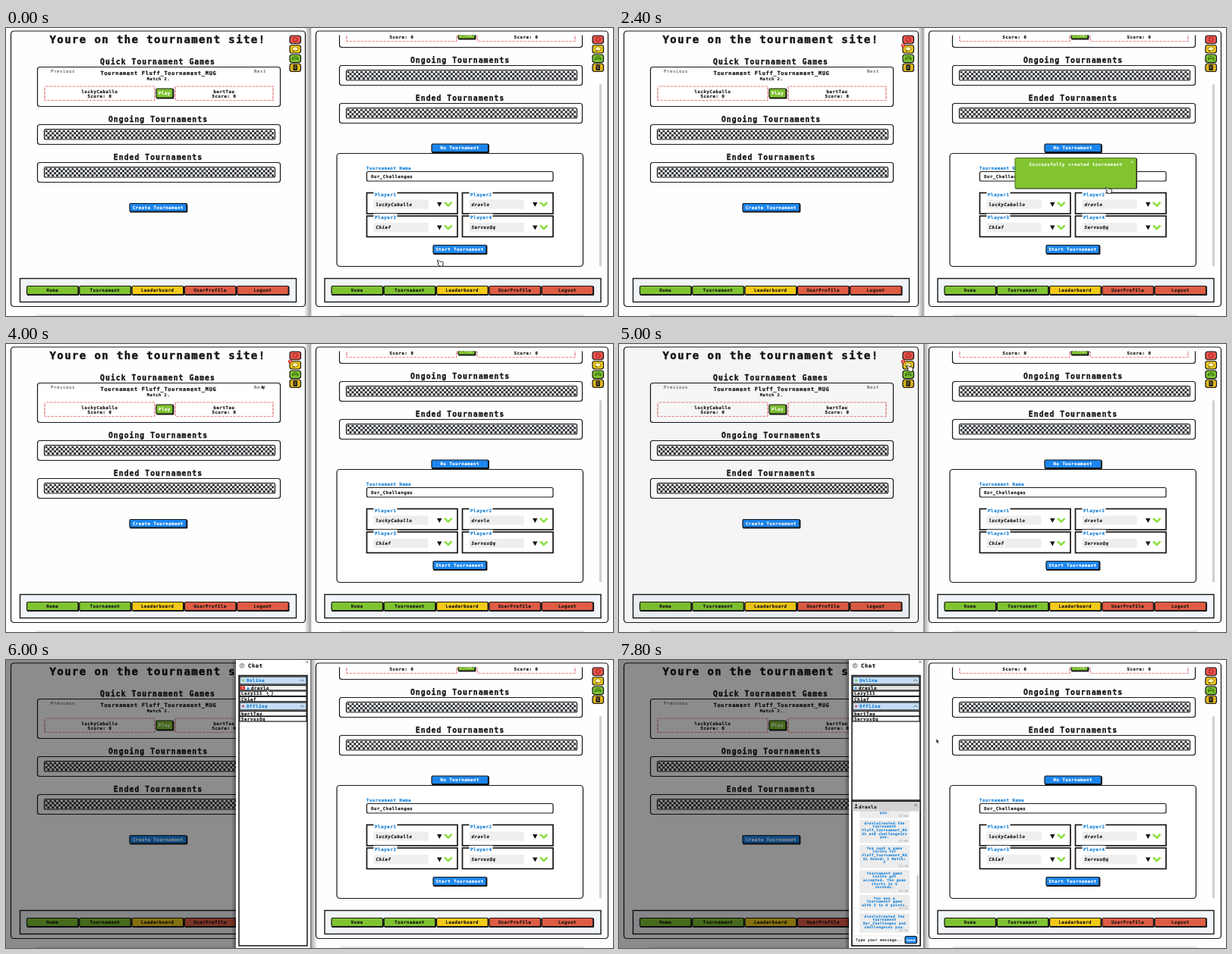
Recreate the animation shown at these times as an HTML page. Size 800 by 380 pixels, loop 8000 ms.

```html
<!DOCTYPE html>
<html lang="en">
<head>
<meta charset="utf-8">
<title>Tournament site</title>
<style>
html, body { margin: 0; width: 100%; height: 100%; overflow: hidden; background: #fdfdfd; }
svg { display: block; width: 800px; height: 380px; }
text { font-family: "DejaVu Sans Mono", "Liberation Mono", monospace; font-weight: 700; letter-spacing: .1em; white-space: pre; stroke-width: .035em; }
.thin { font-weight: 400; }
.slant { font-style: italic; }

.anim { animation: 8s linear infinite; }
.step { animation: 8s step-end infinite; }
#cursor { animation-name: travel; }
#hand { animation-name: hand; }
#arrow { animation-name: arrow; }
#handSize { animation-name: press; }
#toast { animation-name: toast; }
#badge { animation-name: badge; }
#rightFocus { animation-name: rightFocus; }
#leftFocus { animation-name: leftFocus; }
#mask { animation-name: mask; }
#drawer { animation-name: drawer; }
#unread { animation-name: unread; }
#chat { animation-name: chat; }

@keyframes travel {
  0%, 2.5% { transform: translate(572px, 310px); }
  12.5%, 17.5% { transform: translate(602px, 299px); }
  30% { transform: translate(645px, 214px); }
  35%, 37.5% { transform: translate(676px, 177px); }
  47.5%, 52.5% { transform: translate(339px, 57px); }
  60%, 65% { transform: translate(383px, 32px); }
  75%, 80% { transform: translate(347px, 43px); }
  95%, 100% { transform: translate(420px, 107px); }
}
@keyframes hand { 0% { opacity: 1; } 37.5% { opacity: 0; } 57.5% { opacity: 1; } 81% { opacity: 0; } }
@keyframes arrow { 0% { opacity: 0; } 37.5% { opacity: 1; } 57.5% { opacity: 0; } 81% { opacity: 1; } }
@keyframes press { 0% { transform: none; } 14% { transform: scale(.5); } 18% { transform: none; } }
@keyframes toast { 0% { opacity: 0; } 20% { opacity: 1; } 37.5% { opacity: 0; } }
@keyframes badge { 0% { opacity: 0; } 20% { opacity: 1; } }
@keyframes rightFocus { 0% { opacity: 1; } 52.5% { opacity: 0; } }
@keyframes leftFocus { 0% { opacity: 0; } 52.5% { opacity: 1; } }
@keyframes mask { 0%, 62.2% { opacity: 0; } 66%, 100% { opacity: .45; } }
@keyframes drawer {
  0%, 62.5% { transform: translateX(110px); animation-timing-function: cubic-bezier(.23, 1, .32, 1); }
  66.25%, 100% { transform: none; }
}
@keyframes unread { 0% { opacity: 1; } 80% { opacity: 0; } }
@keyframes chat { 0% { opacity: 0; } 80% { opacity: 1; } }
</style>
</head>
<body>
<script>
const INK = '#161616', BLUE = '#1c86ee', LINK = '#1681d8';
const GREEN = '#7fc331', YELLOW = '#f3ca18', RED = '#df5c44';
const GUEST = 'dravlo', HOST = 'luckyCaballo', CUP = 'Fluff_Tournament_MUG', NEW_CUP = 'Our_Challenges';

// Text is sized by its character advance and centred on y.
const text = (x, y, advance, label, { anchor = 'middle', fill = INK, cls = '' } = {}) => {
  const size = advance / .702, stroke = cls === 'thin' ? 'none' : fill;
  return `<text x="${x}" y="${(y + size * .36).toFixed(2)}" font-size="${size.toFixed(2)}" text-anchor="${anchor}" fill="${fill}" stroke="${stroke}" class="${cls}">${label}</text>`;
};
const left = (x, y, advance, label, fill = INK, cls = '') => text(x, y, advance, label, { anchor: 'start', fill, cls });
const box = (x, y, w, h, { fill = '#fff', stroke = INK, width = 1.2, r = 3 } = {}) =>
  `<rect x="${x}" y="${y}" width="${w}" height="${h}" rx="${r}" fill="${fill}" stroke="${stroke}" stroke-width="${width}"/>`;
const plain = (x, y, w, h, fill, r = 0) => box(x, y, w, h, { fill, stroke: 'none', r });
const line = (d, stroke = INK, width = 1) => `<path d="${d}" fill="none" stroke="${stroke}" stroke-width="${width}"/>`;
const dot = (x, y, r, fill) => `<circle cx="${x}" cy="${y}" r="${r}" fill="${fill}"/>`;
const cross = (x, y, r, color = '#555') => line(`M${x - r} ${y - r}l${2 * r} ${2 * r}m0 ${-2 * r}l${-2 * r} ${2 * r}`, color, .7);
const button = (x, y, w, h, fill, label, color = '#fff') =>
  plain(x, y, w + 1.4, h + 1.4, INK, 1.5) + box(x, y, w, h, { fill, r: 1.5 }) + text(x + w / 2, y + h / 2, 3.95, label, { fill: color });

const section = (y, title) => text(200.5, y - 7.5, 6.9, title) + box(41.5, y, 320, 26) +
  box(50.5, y + 6, 304, 13.5, { r: 2 }) +
  `<g transform="translate(51.6 ${y + 7})"><rect width="301.6" height="11.6" fill="url(#checks)"/></g>`;

const player = (x, w, name) =>
  line(`M${x} 77h${w}M${x} 95.5h${w}`, '#ec8585') + line(`M${x} 77v18.5m${w} 0v-18.5`, '#d9545c') +
  `<path d="M${x} 77h${w}v18.5h${-w}z" fill="none" stroke="#fff" stroke-width="1.4" stroke-dasharray="1.6 3.4"/>` +
  text(x + w / 2, 83.5, 4, name) + text(x + w / 2, 89.5, 4, 'Score: 0');

const lists = text(200, 44.5, 6.9, 'Quick Tournament Games') + box(41.5, 51.5, 320, 52) +
  left(59, 57, 4, 'Previous', '#333', 'thin') + left(327, 57, 4, 'Next', '#333', 'thin') +
  text(201, 59.5, 4.94, 'Tournament ' + CUP) + text(201, 67.5, 3.8, 'Match 2.') +
  player(51, 145, HOST) + player(223, 129, 'bertTau') + button(198, 80, 22, 12, GREEN, 'Play') +
  section(127.5, 'Ongoing Tournaments') + section(177.5, 'Ended Tournaments');

const tabs = [['Home', GREEN], ['Tournament', GREEN], ['Leaderboard', YELLOW], ['UserProfile', RED], ['Logout', RED]];
const nav = box(18.5, 330.5, 364, 31, { fill: '#f1f5f9', r: 0, width: 1.4 }) +
  tabs.map(([label, fill], i) => button(27.5 + i * 69.3, 340.5, 67.5, 11, fill, label, INK)).join('');

const icons = [['#e8564e', 10], [YELLOW, 22.5], [GREEN, 35], ['#e0b51c', 47]]
  .map(([fill, y]) => box(374, y, 14.5, 10.5, { fill, r: 3 })).join('') +
  `<circle cx="381.2" cy="15.2" r="2.7" fill="none" stroke="#a51d1d" stroke-width="1.5" stroke-dasharray="1.4 .7"/>` +
  `<ellipse cx="381.2" cy="27.4" rx="3.9" ry="2.8" fill="#fff4a8" stroke="#6b5200" stroke-width=".8"/><path d="M378.5 29.5l-1 2 3-1z" fill="#6b5200"/>` +
  line('M377.5 42q0-4 2-4h3.5q2 0 2 4l-2-1.5h-3.5z', '#28580b') +
  plain(378.5, 48.5, 5.5, 7.5, '#222', 1) + line('M380 51h2.5m-2.5 2h2.5', '#f3ca18', .7);

const field = (x, y, label, name) => box(x, y, 119.5, 27.5, { r: 0, width: 1.7 }) +
  plain(x + 9, y - 3, 31, 6, '#fff') + left(x + 10.5, y + 2, 4.1, label, LINK) +
  plain(x + 9, y + 9, 72, 12, '#eee', 1) + left(x + 12, y + 15, 4, name, INK, 'slant') +
  `<path d="M${x + 92.5} ${y + 12.5}h6.5l-3.2 6z" fill="${INK}"/>` +
  line(`M${x + 102.5} ${y + 12.5}l4.8 4.5l4.8-4.5`, '#8be03f', 2.4);

const form = box(436, 165.5, 324.5, 149, { r: 4 }) + left(475, 185, 3.95, 'Tournament Name', LINK) +
  box(475.5, 189.5, 245.5, 12.5, { r: 2 }) + left(481, 195.5, 3.95, NEW_CUP) +
  field(475.5, 217.5, 'Player1', HOST) + field(601.5, 217.5, 'Player2', GUEST) +
  field(475.5, 248, 'Player3', 'Chief') + field(601.5, 248, 'Player4', 'ServusQq') +
  button(563, 286.5, 70, 11, BLUE, 'Start Tournament');

const toast = plain(522, 171.5, 161, 41, '#333', 1.5) + box(522, 171.5, 159.5, 40, { fill: '#81c42f', stroke: '#4b6e22', r: 1.5, width: 1 }) +
  text(602, 179.5, 3.97, 'Successfully created tournament', { fill: '#f4fbe9' }) + cross(676, 176.5, 1.6, '#eef6df');

const group = (y, color, label) => box(308, y, 88, 10, { fill: '#c5ddf4', r: 0 }) + dot(312.5, y + 5, 1.4, color) +
  left(317, y + 5, 4, label, LINK) + line(`M388 ${y + 6}l2.5-2l2.5 2`, '#555', .8);
const row = (y, label, fill = '#fff', x = 310) => box(308, y, 88, 6.5, { fill, r: 0 }) + left(x, y + 3.4, 4, label);

const messages = [
  [201, '27:06', 'you.'],
  [215, '27:06', GUEST + 'Created the', 'tournament', CUP.slice(0, -1), 'G1 and challengeses', 'you.'],
  [248, '27:10', 'You sent a game', 'invite for', CUP.slice(0, -1), 'G1 Round: 1 Match:', '2'],
  [281, '27:10', 'Tournament game', 'invite got', 'accepted. The game', 'starts in 5', 'seconds.'],
  [314, '33:11', 'You won a', 'Tournament game', 'with 3 to 0 points.'],
  [338, '37:12', GUEST + 'Created the', 'tournament', NEW_CUP + ' and', 'challengeses you.'],
];
const LEADING = 4.7;
const bubble = ([y, time, ...lines]) => {
  const end = y + lines.length * LEADING;
  return plain(317, y - 4, 66, end - y + 7, '#ececec', 1) +
    lines.map((s, i) => text(350, y + i * LEADING, 3.15, s, { fill: LINK })).join('') +
    text(381, end, 2.4, time, { anchor: 'end', fill: '#777', cls: 'thin' });
};

const chat = row(33.5, GUEST, '#e4e6e2', 316) + dot(312, 37, 1.6, BLUE) +
  line('M307 185h90', INK, 1.5) + box(307, 186.5, 90, 190.5, { r: 0, width: 1.5 }) +
  `<g clip-path="url(#log)">${messages.map(bubble).join('')}</g>` +
  plain(307.7, 187.2, 88.6, 12.3, '#d3d3d3') + dot(312.5, 191.5, 1.3, INK) +
  `<path d="M310 195.5q2.5-4 5 0z" fill="${INK}"/>` + left(316, 193.5, 4, GUEST) + cross(391, 191.5, 1.7) +
  plain(392.5, 284, 2.4, 78, '#c4c4c4', 1) +
  plain(308, 362, 88, 14, '#fff') + box(309.5, 364, 65, 10, { r: 2, width: .5, stroke: '#ccc' }) +
  left(312, 369, 3.2, 'Type your message..', '#333') + box(377, 364.5, 15.5, 9.5, { fill: BLUE, r: 2 }) +
  text(384.8, 369.2, 2.8, 'Send', { fill: '#fff' });

const drawer = `<rect x="297" width="6" height="380" fill="url(#fade)" opacity=".35"/>` + plain(303, 0, 98.5, 380, '#fff') +
  cross(397, 2.5, 1.6) + `<circle cx="311" cy="7.5" r="2.8" fill="none" stroke="#333" stroke-width=".7"/>` +
  text(311.2, 7.5, 2.8, '?') + left(319, 7.5, 4.9, 'Chat') + box(307, 20.5, 90, 356.5, { r: 0, width: 1.5 }) +
  group(22, '#7ac943', 'Online') + row(41, 'Lazy111') + row(48.3, 'Chief') +
  group(56, '#d83a3a', 'Offline') + row(67.5, 'bertTau') + row(74.5, 'ServusQq') +
  `<g id="unread" class="step">${row(33.5, GUEST, '#f4f4f4', 323)}${plain(308.5, 34.5, 6.5, 5, '#d9362f', 1)}${text(312, 37, 2.4, '1', { fill: '#fff' })}${dot(319, 37.5, 1.6, BLUE)}</g>` +
  `<g id="chat" class="step">${chat}</g>`;

const cursor = `<g id="cursor" class="anim">
  <g id="hand" class="step"><g id="handSize" class="step"><path d="M-3.8-3.3q1-1.2 2 0l1.7 1.9q.8-1 1.5-.2q1-.7 1.6.2q1.1-.2 1.2 1v2.2l-1 2.5h-3.2l-2.8-2.3q-.5-1.4 1-1z" fill="#fff" stroke="#222"/></g></g>
  <path id="arrow" class="step" d="M-1.8-3v5.5l1.2-1 .8 1.8 1-.4-.8-1.8h1.6z" fill="#111" stroke="#fff" stroke-width=".3"/>
</g>`;

document.body.innerHTML = `<svg viewBox="0 0 800 380">
<defs>
  <pattern id="checks" width="5.8" height="5.8" patternUnits="userSpaceOnUse"><path d="M0 0h2.9v5.8h2.9v-2.9h-5.8z" fill="#212529"/></pattern>
  <linearGradient id="fade"><stop stop-color="#000" stop-opacity="0"/><stop offset="1" stop-color="#000"/></linearGradient>
  <linearGradient id="floor" x2="0" y2="1"><stop stop-color="#000" stop-opacity="0"/><stop offset="1" stop-color="#000" stop-opacity=".13"/></linearGradient>
  <clipPath id="window"><rect width="402" height="380"/></clipPath>
  <clipPath id="scroll"><rect x="409" y="9.5" width="382" height="310"/></clipPath>
  <clipPath id="log"><rect x="308" y="199" width="88" height="163"/></clipPath>
  <g id="lists">${lists}</g><g id="nav">${nav}</g><g id="icons">${icons}</g>
</defs>
<rect width="800" height="380" fill="#fdfdfd"/>
<g clip-path="url(#window)">
  ${box(6.5, 4, 388, 363.5, { r: 4, fill: '#fefefe' })}
  ${text(200, 14.5, 9.83, 'Youre on the tournament site!')}
  <use href="#lists"/>${button(163, 231.5, 75, 10.5, BLUE, 'Create Tournament')}
  <use href="#nav"/><use href="#icons"/>
  <g id="badge" class="step">${dot(374.5, 23, 2.6, '#e0322b')}${text(374.6, 23, 2.4, '1', { fill: '#fff' })}</g>
  <rect x="40" y="377" width="322" height="3" fill="url(#floor)"/>
  <rect id="rightFocus" class="step" x="393" width="9" height="380" fill="url(#fade)" fill-opacity=".38"/>
  <rect id="mask" class="anim" width="402" height="380"/>
  <g id="drawer" class="anim">${drawer}</g>
</g>
${box(408.5, 4, 385, 363.5, { r: 4, fill: '#fefefe' })}
<g clip-path="url(#scroll)">
  <use href="#lists" x="398" y="-78"/>${button(561, 153, 74.5, 10.5, BLUE, 'No Tournament')}${form}
</g>
<use href="#nav" x="401.5"/><use href="#icons" x="399"/>
${plain(782, 74, 3, 240.5, '#cfcfcf', 1.5)}
<rect x="440" y="377" width="322" height="3" fill="url(#floor)"/>
${line('M402 0v380', '#c2c2c2')}
<g id="leftFocus" class="step"><rect x="-410" width="9" height="380" transform="scale(-1 1)" fill="url(#fade)" fill-opacity=".38"/></g>
<g id="toast" class="step">${toast}</g>
${cursor}
</svg>`;
</script>
</body>
</html>
```
